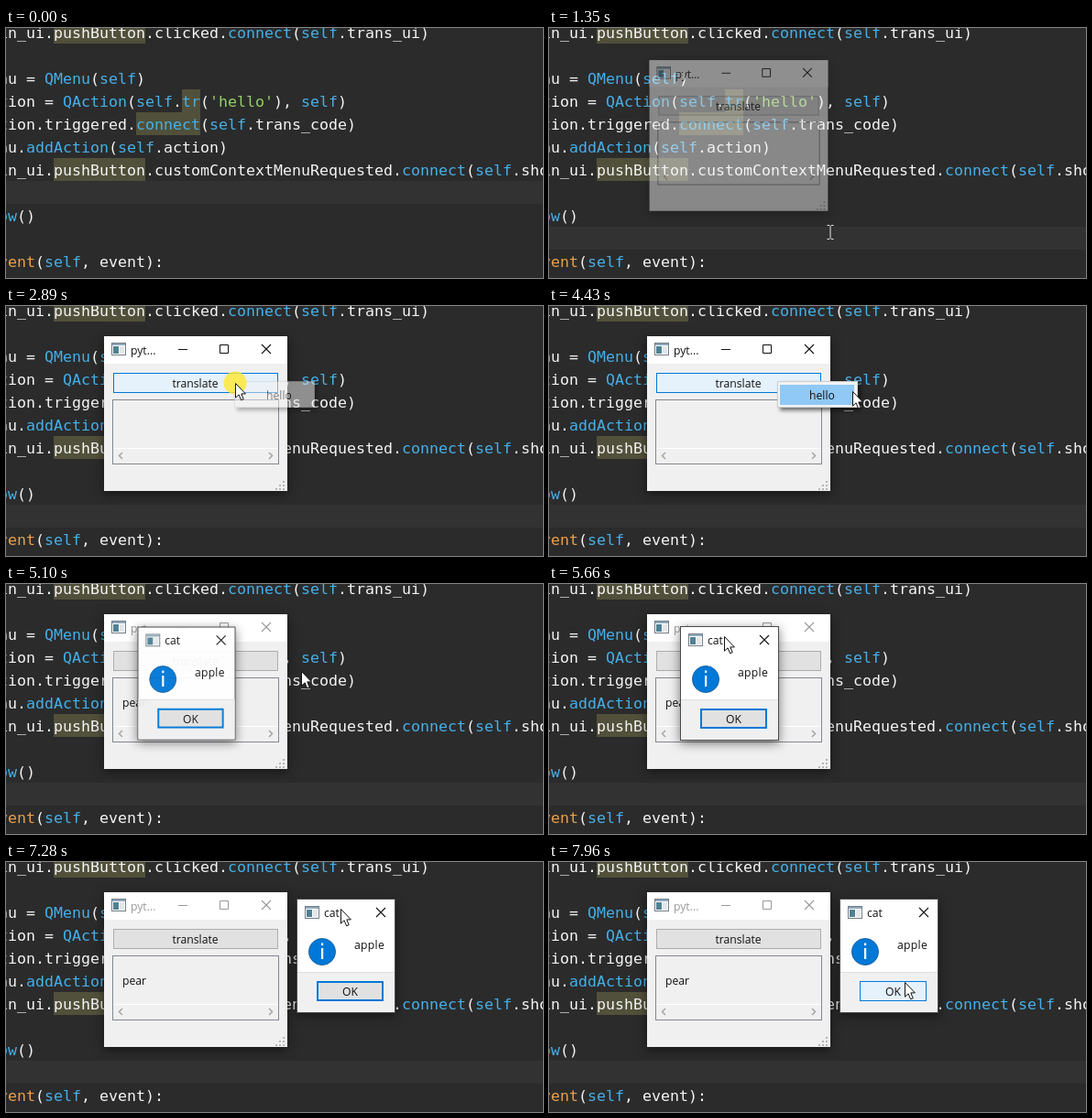
An HTML page for the animation above (8000 ms loop, 586x273 px).

```html
<!DOCTYPE html>
<html lang="en">
<head>
<meta charset="utf-8">
<title>Translate demo</title>
<style>
  html, body { margin: 0; width: 100%; height: 100%; overflow: hidden; background: #2b2b2b; }
  svg { display: block; width: 586px; height: 273px; }
  .code { font: 16.61px "DejaVu Sans Mono", "Noto Sans Mono", monospace; fill: #f4f4f4; white-space: pre; }
  .ui { font: 12.2px "Open Sans", "Noto Sans", sans-serif; fill: #111; }
  .mid { text-anchor: middle; }
  .shadow { filter: drop-shadow(0 3px 6px rgba(0, 0, 0, .5)); }
  .glyph { fill: none; stroke: currentColor; }
</style>
</head>
<body>
<svg id="stage" viewBox="0 0 586 273"></svg>
<script>
const LOOP = 8000;
const BLUE = '#0078d7';

const rect = (x, y, w, h, fill, more = '') =>
  `<rect x="${x}" y="${y}" width="${w}" height="${h}" fill="${fill}" ${more}/>`;
// Box with a crisp one pixel border inside the given edges
const box = (x, y, w, h, fill, line, more = '') =>
  rect(x + .5, y + .5, w - 1, h - 1, fill, `stroke="${line}" ${more}`);
const label = (x, y, text, more = '') => `<text class="ui" x="${x}" y="${y}" ${more}>${text}</text>`;
const cross = (x, y) => `<path class="glyph" stroke-width="1.1" d="M${x} ${y}l10 10m0-10l-10 10"/>`;
const appIcon = (x, y) =>
  box(x, y, 16, 14, '#fdfdfd', '#747c84') + rect(x + 1, y + 1, 14, 2, '#8fa9bd') +
  rect(x + 2, y + 4, 6, 8, '#4f8294') + rect(x + 9, y + 4, 5, 8, '#e3e7ea');

// Editor
const lines = [
  [11, 'in_ui.pushButton.clicked.connect(self.trans_ui)'],
  [61, 'nu = QMenu(self)'],
  [86, "tion = QAction(self.tr('hello'), self)"],
  [111, 'tion.triggered.connect(self.trans_code)'],
  [136, 'nu.addAction(self.action)'],
  [161, 'in_ui.pushButton.customContextMenuRequested.connect(self.sho'],
  [211, 'ow()'],
  [261, 'vent(self, event):']
];
const tint = (color, s) => `<tspan fill="${color}">${s}</tspan>`;
const paint = s => s
  .replace(/\b(self|connect|QMenu|QAction|tr|addAction|ow)\b/g, m => tint('#45b0ea', m))
  .replace(/'hello'/, m => tint('#95d068', m))
  .replace(/^vent/, m => tint('#eaa04c', m));
const marks = [[52, -8, 100], [192, 67, 20], [142, 92, 70], [52, 142, 100]];

const editor = rect(0, 0, 586, 273, '#2b2b2b') +
  rect(0, 167, 586, 25, '#323232', 'id="band"') +
  marks.map(([x, y, w]) => rect(x, y, w, 25, '#51503a')).join('') +
  lines.map(([y, s]) => `<text class="code" x="-8" y="${y}">${paint(s)}</text>`).join('');

// Main window
const grip = [[303, 192], [299, 196], [303, 196], [295, 200], [299, 200], [303, 200]]
  .map(([x, y]) => rect(x - 1, y - 1, 2, 2, '#b4b4b4')).join('');
const main = `<g id="main">
  ${rect(107, 33, 200, 169, '#f0f0f0', 'class="shadow"')}
  ${rect(107, 33, 200, 30, '#fff')}
  ${appIcon(115, 40)}
  <g id="caption">
    ${label(136, 53, 'pyt...', 'style="fill:currentColor"')}
    <path class="glyph" d="M188 47.5h10M233.5 42.5h9v9h-9z"/>
    ${cross(279, 42)}
  </g>
  ${box(117, 73, 180, 22, '#e1e1e1', '#adadad', 'id="push"')}
  ${label(206.5, 89, 'translate', 'class="ui mid"').replace('class="ui" ', '')}
  ${box(116, 102, 182, 71, '#f0f0f0', '#828790')}
  ${rect(117, 155, 180, 1, '#fff')}
  <path class="glyph" stroke="#a6a6a6" style="stroke:#a6a6a6" stroke-width="1.5" d="M127 160l-3.5 3.5l3.5 3.5M287 160l3.5 3.5l-3.5 3.5"/>
  ${grip}
  ${label(127, 134, 'pear', 'id="pear"')}
</g>`;

const menu = `<g id="menu">
  ${box(249, 82, 88, 29, '#f2f2f2', '#cfcfcf', 'style="filter:drop-shadow(3px 3px 2px rgba(0,0,0,.55))"')}
  ${rect(252, 86, 81, 22, '#90c8f6', 'id="item"')}
  ${label(284, 102, 'hello')}
</g>`;

// Message box, drawn from its own corner
const dialog = `<g id="dialog">
  ${rect(-.5, -.5, 107, 124, '#fff', 'class="shadow" stroke="#4a4a4a"')}
  ${rect(0, 79, 106, 44, '#f0f0f0')}${rect(0, 79, 106, 1, '#dfdfdf')}
  ${appIcon(8, 7)}
  ${label(29, 19, 'cat')}
  <g color="#111">${cross(86, 9)}</g>
  <circle cx="27" cy="57" r="14.6" fill="${BLUE}" stroke="#17598f" stroke-width=".8"/>
  ${rect(26, 47.5, 2.2, 2.6, '#fff')}${rect(26, 53, 2.2, 12, '#fff')}
  ${label(62, 54, 'apple', 'letter-spacing=".3"')}
  ${rect(22, 90, 71, 20, '#e1e1e1', `id="ok" stroke="${BLUE}" stroke-width="2"`)}
  <text class="ui mid" x="57.5" y="105">OK</text>
</g>`;

const pointer = `
  <circle id="halo" r="12.5" fill="#ffe92e" opacity=".8"/>
  <path id="beam" fill="none" stroke="#e4e4e4" d="M-3.5 -7.5h2.5l1 1l1-1h2.5M0 -6.5v13M-3.5 7.5h2.5l1-1l1 1h2.5"/>
  <path id="arrow" fill="#fff" stroke="#111" stroke-linejoin="round"
    d="M.5 .5V16.2L4.1 12.8L6.6 18.8L9.2 17.7L6.8 11.9H11.4Z"/>`;

const stage = document.getElementById('stage');
stage.innerHTML = editor + main + menu + dialog + `<g id="cursor">${pointer}</g>`;
const el = {};
stage.querySelectorAll('[id]').forEach(n => el[n.id] = n);

const set = (node, attrs) => { for (const k in attrs) node.setAttribute(k, attrs[k]); };
const show = (node, on) => set(node, { visibility: on ? 'visible' : 'hidden' });
const within = (t, a, b) => t >= a && t < b;
const ease = k => k * k * (3 - 2 * k);
// Progress 0..1 in n equal jumps, the first at a and the last at b
const jumps = (t, a, b, n) =>
  t < a ? 0 : Math.min(1, (Math.floor((t - a) / ((b - a) / (n - 1)) + 1e-6) + 1) / n);

// Pointer moves: start, end, jumps, target
const moves = [
  [130, 410, 5, 307, 223],
  [1700, 2100, 7, 250, 84],
  [3960, 4100, 3, 331, 93],
  [4850, 4990, 3, 322, 95],
  [5240, 5380, 3, 212, 61],
  [5520, 5660, 3, 191, 57],
  [6060, 6270, 4, 358, 57],
  [6340, 6480, 3, 365, 51],
  [7620, 7960, 6, 388, 131]
];
const presses = [[480, 550], [2760, 2960], [4500, 4640], [6060, 7280]];

function pointerAt(t) {
  let x = 462, y = 268;
  for (const [a, b, n, tx, ty] of moves) {
    if (t < a) break;
    const k = ease(jumps(t, a, b, n));
    x += (tx - x) * k;
    y += (ty - y) * k;
  }
  return [Math.round(x), Math.round(y)];
}

// Window pop-up: fades in while growing slightly about its centre
function popUp(node, k, cx, cy, x = 0, y = 0) {
  show(node, k > 0);
  const s = .965 + .035 * k;
  const zoom = k < 1 ? `translate(${cx} ${cy}) scale(${s}) translate(${-cx} ${-cy})` : '';
  set(node, { opacity: 1 - (1 - k) ** 2.2, transform: `translate(${x} ${y}) ${zoom}` });
}

function draw(t) {
  const [x, y] = pointerAt(t);
  set(el.band, { y: t < 480 ? 167 : 217 });

  popUp(el.main, jumps(t, 1350, 1560, 4), 206.5, 117);
  const hover = within(t, 1700, 5240) && y < 95;
  set(el.push, { fill: hover ? '#e5f1fb' : '#e1e1e1', stroke: hover ? BLUE : '#adadad' });
  set(el.caption, { color: t < 4960 ? '#111' : '#999' });
  el.pear.style.visibility = t < 4960 ? 'hidden' : '';

  show(el.menu, within(t, 2890, 4640));
  set(el.menu, { opacity: t < 2960 || t >= 4570 ? .5 : 1 });
  set(el.item, { 'fill-opacity': t < 4030 ? 0 : 1 });

  const [dx, dy] = t < 6060 ? [191, 57] : pointerAt(Math.min(t, 7280));
  popUp(el.dialog, jumps(t, 4960, 5170, 4), 53, 61.5, dx - 47, dy - 10);
  const hot = t > 7620 && y >= 130;
  set(el.ok, hot
    ? { x: 21.5, y: 89.5, width: 72, height: 21, fill: '#e5f1fb', 'stroke-width': 1 }
    : { x: 22, y: 90, width: 71, height: 20, fill: '#e1e1e1', 'stroke-width': 2 });

  const beam = t < 1700 || (t < 2100 && y > 202);
  set(el.cursor, { transform: `translate(${x} ${y})` });
  show(el.beam, beam && t >= 130);
  show(el.arrow, !beam);
  show(el.halo, presses.some(([a, b]) => within(t, a, b)));
}

const start = performance.now();
function tick() {
  draw((performance.now() - start) % LOOP);
  requestAnimationFrame(tick);
}
tick();
</script>
</body>
</html>
```
